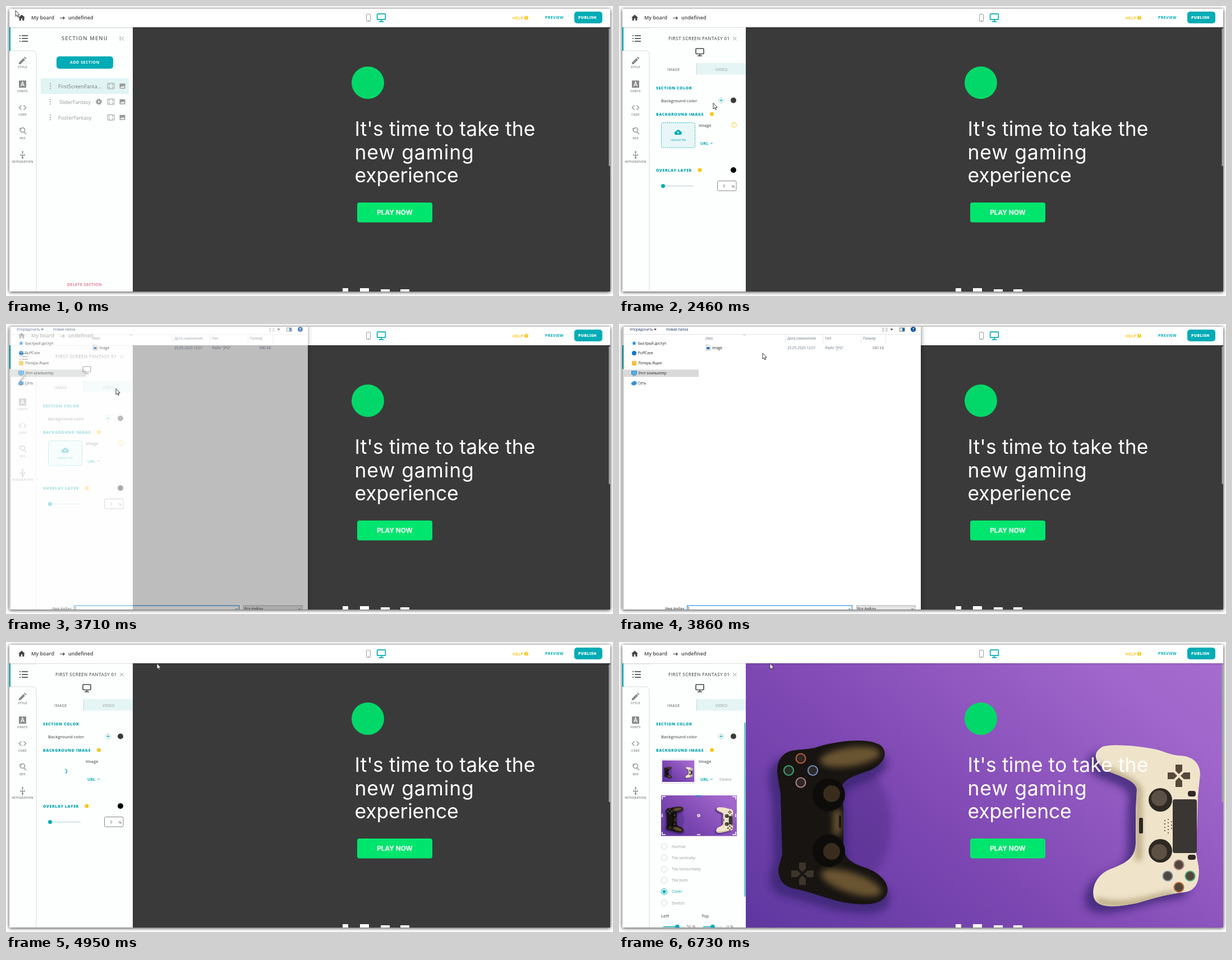
Write an HTML page that moves like this. It is 1082 px wide and 518 px high and loops after 9.74 s.

```html
<!DOCTYPE html>
<html lang="en">
<head>
<meta charset="utf-8">
<title>Section background</title>
<style>
html, body { margin: 0; height: 100%; overflow: hidden; background: #fff; }
svg { display: block; }
text { font-family: "Open Sans", "Noto Sans", sans-serif; fill: #666; white-space: pre; }
.teal { fill: #00acb5; }
.line { fill: none; stroke: #999; }
.tealLine { fill: none; stroke: #00acb5; }
.nav text { font-size: 5px; font-weight: 700; letter-spacing: .4px; text-anchor: middle; fill: #8a8a8a; }
.caps { font-size: 7px; font-weight: 700; letter-spacing: .35px; }
.head { font-size: 7px; font-weight: 800; letter-spacing: .6px; fill: #00a5ae; }
.label { font-size: 7.6px; font-weight: 600; }
.row text { font-size: 9px; fill: #999; }
.hero { font: 35.5px Inter, sans-serif; fill: #fff; }
#dialog text { font-size: 6.4px; fill: #222; }
#dialog .dim { fill: #6c7a8c; }
#dialog .bar { fill: #1c3564; }
</style>
</head>
<body>
<svg id="stage" width="1082" height="518" viewBox="0 0 1082 518">
<defs>
  <clipPath id="windowClip"><rect x="6" y="5" width="1071" height="505"/></clipPath>
  <linearGradient id="purple" x1="0" y1="1" x2="1" y2="0">
    <stop offset="0" stop-color="#55329a"/><stop offset=".45" stop-color="#8049b4"/>
    <stop offset=".8" stop-color="#a066cb"/><stop offset="1" stop-color="#a86fd0"/>
  </linearGradient>
  <linearGradient id="gray">
    <stop offset="0" stop-color="#555"/><stop offset=".45" stop-color="#7d7d7d"/><stop offset="1" stop-color="#8c8c8c"/>
  </linearGradient>
  <filter id="soft" x="-30%" y="-30%" width="160%" height="160%"><feGaussianBlur stdDeviation="7"/></filter>
  <filter id="glow" x="-40%" y="-80%" width="180%" height="260%"><feGaussianBlur stdDeviation="6"/></filter>
  <path id="darkPad" d="M300 197C315 190 338 194 358 186C400 175 445 171 467 185C482 200 470 218 450 228C424 238 398 243 397 262L400 300 400 360C400 385 412 394 436 402C465 411 485 432 477 451C466 473 430 470 400 465C365 457 340 446 315 441C292 437 284 424 284 404L291 380 288 270 282 235C281 215 288 203 300 197Z"/>
  <path id="lightPad" d="M958 192C930 186 880 181 862 187C842 198 848 216 870 230C892 240 922 247 923 264L921 300 921 360C920 385 905 394 880 404C855 412 842 434 846 455C852 479 892 473 925 466C955 457 980 450 1008 447C1030 444 1036 425 1033 400L1029 378 1032 275 1036 236C1035 215 1022 204 1000 203C985 202 972 196 958 192Z"/>
  <clipPath id="darkClip"><use href="#darkPad"/></clipPath>
  <clipPath id="lightClip"><use href="#lightPad"/></clipPath>
  <g id="photo">
    <rect x="226" y="-60" width="851" height="700" fill="url(#purple)"/>
    <ellipse cx="425" cy="325" rx="60" ry="100" fill="#3f2479" opacity=".35" filter="url(#soft)"/>
    <g fill="#32206a" opacity=".7" filter="url(#soft)">
      <use href="#darkPad" x="-15" y="14"/><use href="#darkPad" x="4" y="16"/><use href="#lightPad" x="-15" y="12"/>
    </g>
    <use href="#darkPad" fill="#171411"/>
    <g clip-path="url(#darkClip)"><g fill="#6b5433" filter="url(#glow)">
      <ellipse cx="412" cy="205" rx="54" ry="17" transform="rotate(-8 412 205)"/>
      <ellipse cx="414" cy="430" rx="56" ry="18" transform="rotate(18 414 430)"/>
      <rect x="382" y="300" width="14" height="44"/>
    </g></g>
    <g fill="#0e0c0a"><circle cx="374" cy="273" r="29"/><circle cx="374" cy="373" r="29"/></g>
    <g fill="#382d1c"><circle cx="379" cy="271" r="15"/><circle cx="379" cy="374" r="15"/></g>
    <path d="M394 310v22" stroke="#1d1812" stroke-width="4"/>
    <use href="#lightPad" fill="#efe4ca"/>
    <g clip-path="url(#lightClip)"><path d="M850 218C890 240 915 246 926 262V390M850 462C895 476 930 463 990 450" fill="none" stroke="#a8946c" stroke-width="9" filter="url(#glow)"/></g>
    <rect x="987" y="281" width="43" height="96" rx="4" fill="#3a3633"/>
    <rect x="927" y="314" width="7" height="28" rx="2" fill="#2b2725"/>
    <g fill="#2f2924"><circle cx="965" cy="282" r="21"/><circle cx="965" cy="373" r="21"/>
      <rect x="1014" y="266" width="14" height="10" rx="4"/><rect x="1014" y="380" width="14" height="9" rx="4"/></g>
    <g fill="#5d5145"><circle cx="963" cy="279" r="14"/><circle cx="963" cy="375" r="14"/></g>
    <path d="M973 318v22M979 316v26M985 320v18" stroke="#6b6152" stroke-width="2" stroke-dasharray="2 4"/>
    <g id="padButtons" stroke-width="2.2"></g>
  </g>
  <g id="monitor" fill="none" stroke="currentColor" stroke-width="1.6">
    <rect x="-7" y="-6.5" width="14" height="9.5" rx="1"/><path d="M-4 6.5h8M0 3v3.5"/>
  </g>
  <g id="dots" fill="currentColor"><circle r="1.1"/><circle cy="-4" r="1.1"/><circle cy="4" r="1.1"/></g>
  <g id="crop" fill="none" stroke="currentColor">
    <rect x="-6" y="-5" width="12" height="10" rx="1"/>
    <path d="M-3.5-1v-2h2M3.5-1v-2h-2M-3.5 1v2h2M3.5 1v2h-2"/>
  </g>
  <g id="picture"><rect x="-5" y="-4.5" width="10" height="9" rx="1" fill="currentColor"/>
    <path d="M-3.8 3l2.2-3L0 1.8 1.8-.8 4 3z" fill="#fff"/></g>
</defs>

<rect x="6" y="5" width="1071" height="505" fill="#fff" style="filter:drop-shadow(0 1px 3px #000c)"/>
<g clip-path="url(#windowClip)">
  <rect x="226" y="38" width="851" height="472" fill="#3a3a3a"/>
  <rect id="grayStrip" x="226" y="38" width="851" height="110" fill="url(#gray)"/>
  <svg id="fullPhoto" x="226" y="38" width="851" height="472" viewBox="226 38 851 472"><use href="#photo"/></svg>
  <circle cx="645" cy="137" r="29" fill="#02d869"/>
  <text class="hero" x="621.5" y="232" letter-spacing=".1">It's time to take the</text>
  <text class="hero" x="621.5" y="273.5" letter-spacing=".9">new gaming</text>
  <text class="hero" x="621.5" y="315" letter-spacing="-.15">experience</text>
  <rect x="626" y="351" width="134" height="35.5" rx="4" fill="#00e56d"/>
  <text x="693" y="372.7" text-anchor="middle" style="font:700 11.8px Inter,sans-serif;fill:#fff">PLAY NOW</text>
  <path d="M600 504h10v10h-10zM631 504h16v16h-16zM668 506h16v16h-16zM703 506h16v16h-16z" fill="#fff"/>
  <rect x="1074.5" y="40" width="2.5" height="246" rx="1" fill="#a2a2a2"/>

  <rect x="6" y="38" width="220" height="472" fill="#fdfefe"/>
  <rect x="6" y="5" width="1071" height="33" fill="#fff" style="filter:drop-shadow(0 1px 1px #0003)"/>
  <path d="M28 15.5l6 5.3h-1.6V26h-3.2v-3.7h-2.4V26h-3.2v-5.2H22z" fill="#444"/>
  <g font-size="9" font-weight="600"><text x="45" y="24" style="fill:#444">My board</text><text x="111" y="24" style="fill:#444">undefined</text></g>
  <path d="M96 21.5h8m-2.5-2.5l2.7 2.5-2.7 2.5" fill="none" stroke="#444" stroke-width="1.2"/>
  <rect class="line" x="642.5" y="14.5" width="7" height="13" rx="1.5"/><path class="line" d="M645 26h2"/>
  <use href="#monitor" transform="translate(669 21) scale(1.05)" color="#00acb5"/>
  <text class="caps" x="903" y="23.5" style="fill:#fbc719">HELP</text>
  <circle cx="927.5" cy="21" r="3.6" fill="#fbc719"/><text x="926.2" y="23.2" font-size="6" font-weight="700" style="fill:#fff">?</text>
  <text class="caps teal" x="961" y="23.2">PREVIEW</text>
  <rect class="teal" x="1013" y="10" width="50" height="21" rx="5"/>
  <text class="caps" x="1020" y="23" style="fill:#fff;font-weight:800">PUBLISH</text>

  <path d="M6 80h41q7 0 7 7v423" fill="none" stroke="#d9dcdc"/>
  <rect class="teal" x="6" y="38" width="2" height="42"/>
  <path d="M24 53h2m2 0h11M24 58h2m2 0h11M24 63h2m2 0h11" stroke="#333" stroke-width="1.7"/>
  <g class="nav">
    <path d="M23 104v-3l8-8 3 3-8 8zM32 92l1.500-1.500 3 3L35 95z" fill="#8a8a8a"/><text x="29.500" y="111">STYLE</text>
    <rect x="23" y="133" width="13" height="13" rx="1" fill="#8a8a8a"/><path d="M26.500 143.500l3-8 3 8m-5-2.700h4" fill="none" stroke="#fff" stroke-width="1.200"/><text x="29.500" y="154">FONTS</text>
    <path class="line" d="M27.500 177.500l-4 4 4 4m4-8l4 4-4 4" stroke-width="1.500"/><text x="29.500" y="196">CODE</text>
    <g class="line" stroke-width="1.600"><path d="M24 219h4m-2 3h-2"/><circle cx="29.500" cy="221.500" r="4"/><path d="M32 225l4 4"/></g><text x="29.500" y="238">SEO</text>
    <path class="line" d="M29.500 260v11m-3.500-7v3h7v-3" stroke-width="1.300"/><circle cx="29.500" cy="271" r="1.700" fill="#8a8a8a"/><path d="M27.500 261.500l2-3 2 3z" fill="#8a8a8a"/><text x="29.500" y="280">INTEGRATION</text>
  </g>

  <g id="menu">
    <text x="99" y="60.500" font-size="9.500" font-weight="600" letter-spacing="1">SECTION MENU</text>
    <path class="line" d="M203.500 54v8m6.500-7.500l-4 3.500 4 3.500"/>
    <rect class="teal" x="90" y="90" width="101" height="22" rx="5"/>
    <text class="caps" x="114" y="103.200" style="fill:#fff;letter-spacing:.55px">ADD SECTION</text>
    <rect x="62" y="129" width="157" height="28" fill="#e1f4f4"/>
    <g id="rows"></g>
    <circle class="line" cx="165.500" cy="171" r="3" stroke-width="2.600"/>
    <circle class="line" cx="165.500" cy="171" r="4.800" stroke-width="1.600" stroke-dasharray="2 1.770"/>
    <text x="109" y="499.500" font-size="7" font-weight="600" letter-spacing=".45" style="fill:#df5c7d">DELETE SECTION</text>
  </g>

  <g id="panel">
    <rect x="55" y="39" width="171" height="471" fill="#fdfefe"/>
    <text x="88" y="61" font-size="8" font-weight="600" letter-spacing=".42">FIRST SCREEN FANTASY 01</text>
    <path class="line" d="M203 55l6.500 6.500m0-6.500l-6.500 6.500"/>
    <use href="#monitor" x="144" y="82.500" color="#444"/>
    <rect x="138" y="102" width="88" height="20.500" fill="#e5f5f5"/><path d="M138.500 102v20.500" stroke="#c3d8d8"/>
    <g font-size="7" letter-spacing=".2"><text x="86" y="115.500">IMAGE</text><text x="172" y="115.500" style="fill:#999">VIDEO</text></g>
    <text class="head" x="66" y="149">SECTION COLOR</text>
    <text class="label" x="75" y="171.500">Background color</text>
    <circle cx="182" cy="168.500" r="5" fill="#fff" stroke="#bcdcde"/><path class="tealLine" d="M179 168.500h6m-3-3v6"/>
    <circle cx="204" cy="168.500" r="5" fill="#3a3a3a"/>
    <text class="head" x="66" y="195.500">BACKGROUND IMAGE</text><circle cx="165.500" cy="193" r="3.500" fill="#fbc719"/>
    <g id="upload">
      <rect x="75.500" y="208.500" width="60" height="44.500" rx="3" fill="#e9f6f7" stroke="#00acb5" stroke-dasharray="2 1.500" stroke-width=".9"/>
      <path class="teal" d="M102 230a3 3 0 0 1-.5-6 4 4 0 0 1 7.500-.5 3.300 3.300 0 0 1 .3 6.500z"/><path d="M105.300 228.500v-4m-2 2l2-2 2 2" fill="none" stroke="#fff"/>
      <text class="teal" x="92" y="240.500" font-size="5.400">Upload file</text>
      <circle cx="205" cy="212.500" r="4.300" fill="none" stroke="#fbc719"/><text x="203.300" y="215.300" font-size="7" style="fill:#fbc719">?</text>
    </g>
    <g id="spinner"><circle class="tealLine" cx="105" cy="231" r="3.600" stroke-width="1.300"/></g>
    <g id="thumb">
      <rect x="75.500" y="209.500" width="59" height="43" fill="#fff" stroke="#ddd"/>
      <svg x="77" y="211.500" width="57" height="38.500" viewBox="226 4 851 575"><use href="#photo"/></svg>
    </g>
    <text class="label" x="142" y="215.500">Image</text>
    <text class="teal" x="145" y="247.500" font-size="7.200" font-weight="700">URL</text><path class="tealLine" d="M163 244l2 2 2-2"/>
    <g id="overlay">
      <text class="head" x="66" y="295.500">OVERLAY LAYER</text><circle cx="144" cy="293" r="3.500" fill="#fbc719"/>
      <circle cx="204" cy="293" r="5"/>
      <path d="M78 321.500h55" stroke="#a9cfd2"/><circle class="teal" cx="78.500" cy="321.500" r="3.500"/>
      <rect x="175.500" y="312.500" width="33.500" height="17.500" rx="2" fill="#fff" stroke="#888"/>
      <text x="185.500" y="324" font-size="7">0</text><text x="200.500" y="324.500" font-size="7">%</text>
    </g>
    <g id="options">
      <text x="179" y="247.500" font-size="7.200" style="fill:#999">Delete</text>
      <rect x="75" y="274" width="135" height="72.500" fill="#d9d9d9"/>
      <rect id="grayPreview" x="75" y="274" width="135" height="17" fill="url(#gray)"/>
      <svg id="photoPreview" x="75" y="274" width="135" height="72.500" viewBox="226 50 851 457"><use href="#photo"/></svg>
      <path d="M77 281v-5h6M208 281v-5h-6M77 339v5h6M208 339v5h-6M77 307v6M208 307v6M139 344h6" fill="none" stroke="#fff" stroke-width="1.500"/>
      <path class="tealLine" d="M138 274.500h8" stroke-width="2"/><circle cx="142" cy="310" r="2.700" fill="#fff"/>
      <circle id="focus" cx="142" cy="310" r="1" fill="#7d49b0"/>
      <g id="radios" font-size="7"></g>
      <text class="label" x="75" y="492">Left</text><text class="label" x="147" y="492">Top</text>
      <path d="M79 508.500h39M150 508.500h34" stroke="#bcdcde"/><path class="tealLine" d="M79 508.500h25M150 508.500h17" stroke-width="1.500"/>
      <circle class="teal" cx="104" cy="508.500" r="3.800"/><circle class="teal" cx="167" cy="508.500" r="3.800"/>
      <g font-size="7.200"><text x="120.500" y="511">50 %</text><text x="192" y="511">0 %</text></g>
      <rect x="223" y="144" width="2.800" height="311" fill="#68cbd0"/>
    </g>
  </g>

  <g id="dialog">
    <rect x="8.500" y="0" width="529.500" height="530" fill="#fff" style="filter:drop-shadow(0 0 4px #0008)"/>
    <text class="bar" x="19" y="12">Упорядочить</text><text class="bar" x="84" y="12">Новая папка</text>
    <path d="M62 8.500h5l-2.500 3zM483.500 8.500h5l-2.500 3z" fill="#333"/>
    <path d="M469 7.500h4m2 0h4M469 10h4m2 0h4M469 12.500h4m2 0h4" stroke="#888" stroke-dasharray="1.500 .5"/>
    <rect x="500.500" y="7" width="8.500" height="6" fill="#fff" stroke="#777"/><rect x="505" y="7" width="4" height="6" fill="#2a6db0"/>
    <circle cx="524.500" cy="9.500" r="4.600" fill="#0b4f9c"/><text x="523" y="12" style="fill:#fff;font-weight:700">?</text>
    <path d="M9 18.500h529M296.500 18v16M363.500 18v16M431.500 18v16M475.500 18v16" stroke="#e6e6e6"/>
    <path class="line" d="M221.500 21l2-2 2 2" stroke-width=".8"/>
    <text class="dim" x="154" y="28">Имя</text><text class="dim" x="300" y="28">Дата изменения</text>
    <text class="dim" x="367" y="28">Тип</text><text class="dim" x="435" y="28">Размер</text>
    <rect id="fileRow" x="148" y="36" width="328" height="12" fill="#cce8ff"/>
    <path d="M155.500 37.500h5l2.500 2.500v6.500h-7.500z" fill="#fff" stroke="#999" stroke-width=".7"/><rect x="156.500" y="41" width="5" height="4" fill="#2469b3"/>
    <text x="166" y="44.500">image</text>
    <text class="dim" x="300" y="44.500">25.05.2020 12:01</text><text class="dim" x="367" y="44.500">Файл "JPG"</text><text class="dim" x="452" y="44.500">680 КБ</text>
    <rect x="9" y="81.500" width="133" height="13" fill="#d9d9d9"/>
    <path d="M27 30l1.200 2.800 3 .2-2.300 2 .7 3-2.600-1.600-2.600 1.600.7-3-2.300-2 3-.2z" fill="#2b8fd8"/>
    <circle cx="27" cy="52" r="4" fill="#0f78d0"/>
    <rect x="23" y="66" width="8" height="8" fill="#f3c13a"/>
    <rect x="22.500" y="84" width="9" height="6" fill="#4bb3ee" stroke="#2374b0" stroke-width=".8"/><path d="M24 92h6" stroke="#2374b0"/>
    <path d="M22 105l5-3.500 4.500 2v4l-5 2.500-4.500-2z" fill="#3c8fd0"/>
    <g id="places"></g>
    <text x="82" y="511">Имя файла:</text>
    <rect x="121.500" y="503" width="294" height="13" fill="#fff" stroke="#0078d7"/>
    <path id="caret" d="M124 505v8" stroke="#222" stroke-width=".8"/><text id="fileName" x="124" y="511">image</text>
    <rect x="423.500" y="503" width="104.500" height="13" fill="#e6e6e6" stroke="#aaa"/><text x="425" y="511">Все файлы</text>
    <path d="M409 508l2 2 2-2M521 508l2 2 2-2" fill="none" stroke="#444" stroke-width=".8"/>
  </g>
</g>
<g id="cursor" fill="#fff" stroke="#222" stroke-width=".9" stroke-linejoin="round">
  <path id="arrow" d="M0 0V10.500L2.400 8.400 4 12 5.600 11.300 4 7.900H7.200Z"/>
  <path id="hand" d="M-1.200 1.200q0-1.200 1.200-1.200t1.200 1.200V5l4 .8q2 .4 1.800 2.400l-.7 4q-.2 1.300-1.400 1.300H1q-.9 0-1.500-.8L-3.800 8.600q-.8-1 0-1.500t2 .3l.6.600z"/>
</g>
</svg>
<script>
const LOOP = 9740;
const $ = id => document.getElementById(id);
const show = (id, on) => $(id).style.display = on ? "" : "none";
const fill = (id, items, draw) => $(id).innerHTML = items.map(draw).join("");

fill("rows", ["FirstScreenFanta...", "SliderFantasy", "FooterFantasy"], (name, i) => {
  const y = 143 + 28 * i;
  return `<g class="row"><text x="${i == 1 ? 95 : 93}" y="${y + 3.5}" ${i ? "" : 'style="fill:#777"'}>${name}</text>
    <g ${i ? "" : 'id="rowIcons"'} color="#999"><use href="#dots" x="79" y="${y}"/>
    <use href="#crop" x="187" y="${y}"/><use href="#picture" x="207.500" y="${y}"/></g></g>`;
});

fill("radios", ["Normal", "Tile vertically", "Tile horizontally", "Tile both", "Cover", "Stretch"], (name, i) => {
  const y = 365.5 + 20.1 * i, on = name == "Cover";
  return `<circle cx="80.500" cy="${y}" r="5.300" fill="#fff" stroke="${on ? "#00acb5" : "#cfd6d6"}"/>
    ${on ? `<circle class="teal" cx="80.500" cy="${y}" r="3"/>` : ""}
    <text x="94" y="${y + 2.5}" style="fill:${on ? "#00acb5" : "#999"}">${name}</text>`;
});

fill("places", ["Быстрый доступ", "PuffCase", "Лопарь.Ящик", "Этот компьютер", "Сеть"],
  (name, i) => `<text x="34" y="${36.5 + 17.9 * i}">${name}</text>`);

// Four round buttons and a four-part cross on each pad
const ring = (cx, cy, r, colors, face) => colors.map((c, i) =>
  `<circle cx="${cx + r * Math.sin(i * Math.PI / 2)}" cy="${cy - r * Math.cos(i * Math.PI / 2)}" r="8.500" fill="${face}" stroke="${c}"/>`).join("");
const cross = (cx, cy, color) => [0, 90, 180, 270].map(a =>
  `<path d="M-6-20h12v11l-6 6-6-6z" fill="${color}" transform="translate(${cx} ${cy}) rotate(${a})"/>`).join("");
$("padButtons").innerHTML =
  ring(324, 229.5, 21.5, ["#b8583a", "#7488b8", "#b07a92", "#35a374"], "#2c2825") + cross(327, 414, "#3d342a") +
  ring(998, 418, 20, ["#b07a82", "#4da375", "#c06a3c", "#7f8aa6"], "#50463b") + cross(998, 239, "#584839");

// Stepped progress: n equal jumps, the first at a, the last at b
const stepped = (t, a, b, n) =>
  t < a ? 0 : t >= b ? 1 : (Math.floor((t - a) / (b - a) * (n - 1)) + 1) / n;

// start, end, steps, x, y
const moves = [
  [900, 1380, 7, 222, 134], [1460, 1540, 2, 207, 140.5],
  [2300, 2770, 7, 116, 217], [2920, 3000, 2, 113, 211],
  [3170, 3540, 5, 136, 179], [3620, 3860, 4, 256, 52], [3930, 4000, 2, 269, 38]
];

function cursorAt(t) {
  let x = 17, y = 8;
  for (const [a, b, n, toX, toY] of moves) {
    const p = stepped(t, a, b, n);
    x += (toX - x) * p;
    y += (toY - y) * p;
  }
  return [x, y];
}

function render(t) {
  const within = (a, b) => t >= a && t < b;
  const [x, y] = cursorAt(t);
  $("cursor").setAttribute("transform", `translate(${x} ${y})`);
  const pointing = within(1460, 1760) || within(2690, 3330);
  show("hand", pointing);
  show("arrow", !pointing);

  $("rowIcons").setAttribute("color", t >= 1460 ? "#444" : "#999");
  show("menu", t < 1830);
  $("panel").style.opacity = stepped(t, 1690, 1830, 3);

  $("dialog").style.opacity = stepped(t, 3620, 3780, 3) - stepped(t, 4480, 4640, 3);
  show("fileRow", t >= 4000);
  $("fileRow").setAttribute("fill", t < 4250 ? "#e5f3ff" : "#cce8ff");
  show("fileName", t >= 4250);
  show("caret", t < 4250);

  const uploading = t >= 4480, expanded = t >= 5340, strip = within(5790, 6730), done = t >= 6730;
  show("upload", !uploading);
  show("spinner", uploading && !done);
  $("spinner").setAttribute("stroke-dasharray", t < 5640 ? "10 12.620" : "none");
  $("spinner").setAttribute("transform", `rotate(${(t - 4950) * .6 - 90} 105 231)`);
  show("overlay", !expanded);
  show("options", expanded);
  show("grayStrip", strip);
  show("grayPreview", strip);
  for (const id of ["fullPhoto", "photoPreview", "thumb", "focus"]) show(id, done);
}

function tick() {
  render(performance.now() % LOOP);
  requestAnimationFrame(tick);
}
tick();
</script>
</body>
</html>
```
